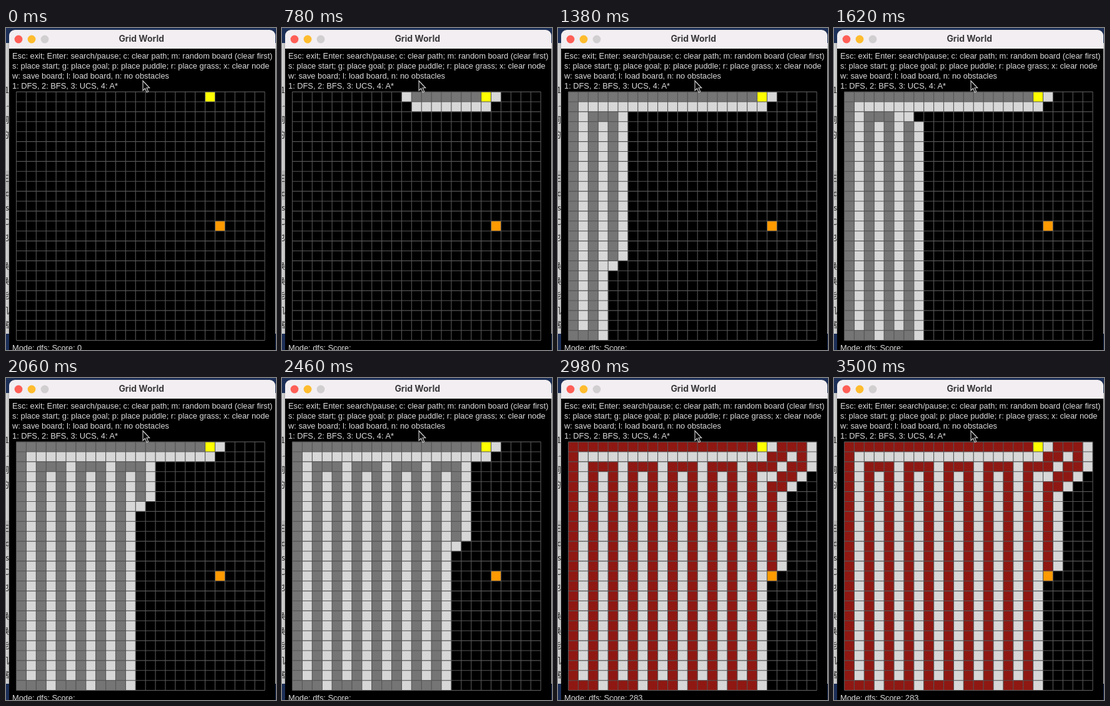
An HTML page for the animation above (3.54 s loop, 432x515 px).

```html
<!DOCTYPE html>
<html lang="en">
<head>
<meta charset="utf-8">
<title>Grid World</title>
<style>
  html, body { margin: 0; width: 100%; height: 100%; overflow: hidden; background: #000; }
  svg { display: block; }
  text { white-space: pre; }
  .info { font: 12.84px "Liberation Sans", Arial, sans-serif; fill: #dcdcdc; }
  .title { font: 700 13.9px Inter, sans-serif; fill: #3b393b; text-anchor: middle; }
  .behind { font: 13px "Noto Sans CJK SC", "Noto Sans CJK", "Noto Sans", sans-serif; fill: #222; text-anchor: end; }
  #lines { stroke: #565656; stroke-width: 1.1; fill: none; }
</style>
</head>
<body>
<svg id="stage" width="432" height="515" viewBox="0 0 432 515">
  <defs>
    <linearGradient id="shade">
      <stop offset="0" stop-color="#dadada"/>
      <stop offset="1" stop-color="#b4b4b4"/>
    </linearGradient>
  </defs>
  <rect width="432" height="515" fill="#1b2f57"/>
  <rect y="24" width="5" height="465" fill="url(#shade)"/>
  <rect x="420" y="24" width="12" height="465" fill="#cfcfcf"/>
  <rect y="228" width="5" height="47" fill="#000" opacity=".1"/>
  <g id="behind" class="behind"></g>
  <path d="M5 515V12a9 9 0 0 1 9-9H422a9 9 0 0 1 9 9V515z" fill="#000"/>
  <path d="M5 33V12a9 9 0 0 1 9-9H422a9 9 0 0 1 9 9V33z" fill="#f2eef1"/>
  <circle cx="20" cy="18" r="6.4" fill="#fe5f57"/>
  <circle cx="41" cy="18" r="6.4" fill="#febc2e"/>
  <circle cx="62" cy="18" r="6.4" fill="#d2cfd1"/>
  <text class="title" x="216.7" y="22.4">Grid World</text>
  <g class="info">
    <text x="10" y="49.2">Esc: exit; Enter: search/pause; c: clear path; m: random board (clear first)</text>
    <text x="10" y="65.2">s: place start; g: place goal; p: place puddle; r: place grass; x: clear node</text>
    <text x="10" y="81.2">w: save board; l: load board, n: no obstacles</text>
    <text x="10" y="97.2">1: DFS, 2: BFS, 3: UCS, 4: A*</text>
    <text x="10" y="516.3" id="status">Mode: dfs; Score: 0</text>
  </g>
  <g id="cells"></g>
  <path id="lines"/>
  <path d="M219 84.5v15.5l3.5-3.2 2.6 6 2.6-1.1-2.6-5.9h4.6z" fill="#0a0a0a" stroke="#d8d8d8" stroke-width="1.1"/>
</svg>
<script>
const SIZE = 25, PITCH = 15.9, LEFT = 16.5, TOP = 102.1;
const START = [19, 0], GOAL = [20, 13];
const LOOP = 3540, HOLD = 500, TICK = 40, FOUND = 2950;
// [ms, steps searched]
const PACE = [[720, 0], [1140, 53], [1620, 114], [2060, 168], [2460, 220], [FOUND, 282]];
const DIRS = [[-1, 0], [0, -1], [0, 1], [1, 0]];
const NS = "http://www.w3.org/2000/svg";
const $ = id => document.getElementById(id);

function add(parent, tag, attrs, text = "") {
  const el = document.createElementNS(NS, tag);
  for (const k in attrs) el.setAttribute(k, attrs[k]);
  el.textContent = text;
  parent.append(el);
  return el;
}

// Depth-first search that marks a node as soon as it is discovered.
function search() {
  const found = new Map();
  const node = (x, y, seen) => {
    const n = { x, y, seen, visited: Infinity };
    found.set(y * SIZE + x, n);
    return n;
  };
  const stack = [node(...START, 0)];
  for (let step = 0; stack.length; step++) {
    const cur = stack.pop();
    cur.visited = step;
    if (cur.x === GOAL[0] && cur.y === GOAL[1]) break;
    const next = [];
    for (const [dx, dy] of DIRS) {
      const x = cur.x + dx, y = cur.y + dy;
      if (x < 0 || y < 0 || x >= SIZE || y >= SIZE || found.has(y * SIZE + x)) continue;
      next.push(node(x, y, step));
    }
    stack.push(...next.reverse());
  }
  return [...found.values()];
}

function drawCell(x, y, fill) {
  return add($("cells"), "rect", {
    x: LEFT + x * PITCH, y: TOP + y * PITCH, width: PITCH, height: PITCH, fill
  });
}

const nodes = search();
for (const n of nodes) n.rect = drawCell(n.x, n.y, "none");
drawCell(...START, "#ffff00");
drawCell(...GOAL, "#ff9a00");

let grid = "";
for (let i = 0; i <= SIZE; i++) {
  const p = i * PITCH, span = SIZE * PITCH;
  grid += `M${LEFT + p} ${TOP}v${span}M${LEFT} ${TOP + p}h${span}`;
}
$("lines").setAttribute("d", grid);

const scraps = { 104: "1", 126: "1.", 151: "词", 175: "的", 245: "正", 269: "c", 292: "ls", 315: "C",
  339: "也", 385: "换", 409: "换", 432: "能", 456: "机", 479: "据" };
for (const y in scraps) add($("behind"), "text", { x: 5, y }, scraps[y]);

function stepsAt(t) {
  if (t < PACE[0][0]) return -1;
  for (let i = 1; i < PACE.length; i++) {
    const [t0, n0] = PACE[i - 1], [t1, n1] = PACE[i];
    if (t <= t1) return Math.floor(n0 + (n1 - n0) * (t - t0) / (t1 - t0));
  }
  return Infinity;
}

let shown;
function render(ms) {
  const t = ms < HOLD ? 0 : HOLD + Math.floor((ms - HOLD) / TICK) * TICK;
  const n = stepsAt(t);
  if (n === shown) return;
  shown = n;
  const done = t >= FOUND;
  for (const c of nodes) {
    const fill = c.visited <= n && c.visited < Infinity ? (done ? "#8f1813" : "#757575")
      : c.seen <= n ? "#d7d7d7" : "none";
    c.rect.setAttribute("fill", fill);
  }
  $("status").textContent = "Mode: dfs; Score: " + (done ? 283 : n < 0 ? 0 : "");
}

const begin = performance.now();
function frame() {
  render((performance.now() - begin) % LOOP);
  requestAnimationFrame(frame);
}
frame();
</script>
</body>
</html>
```
